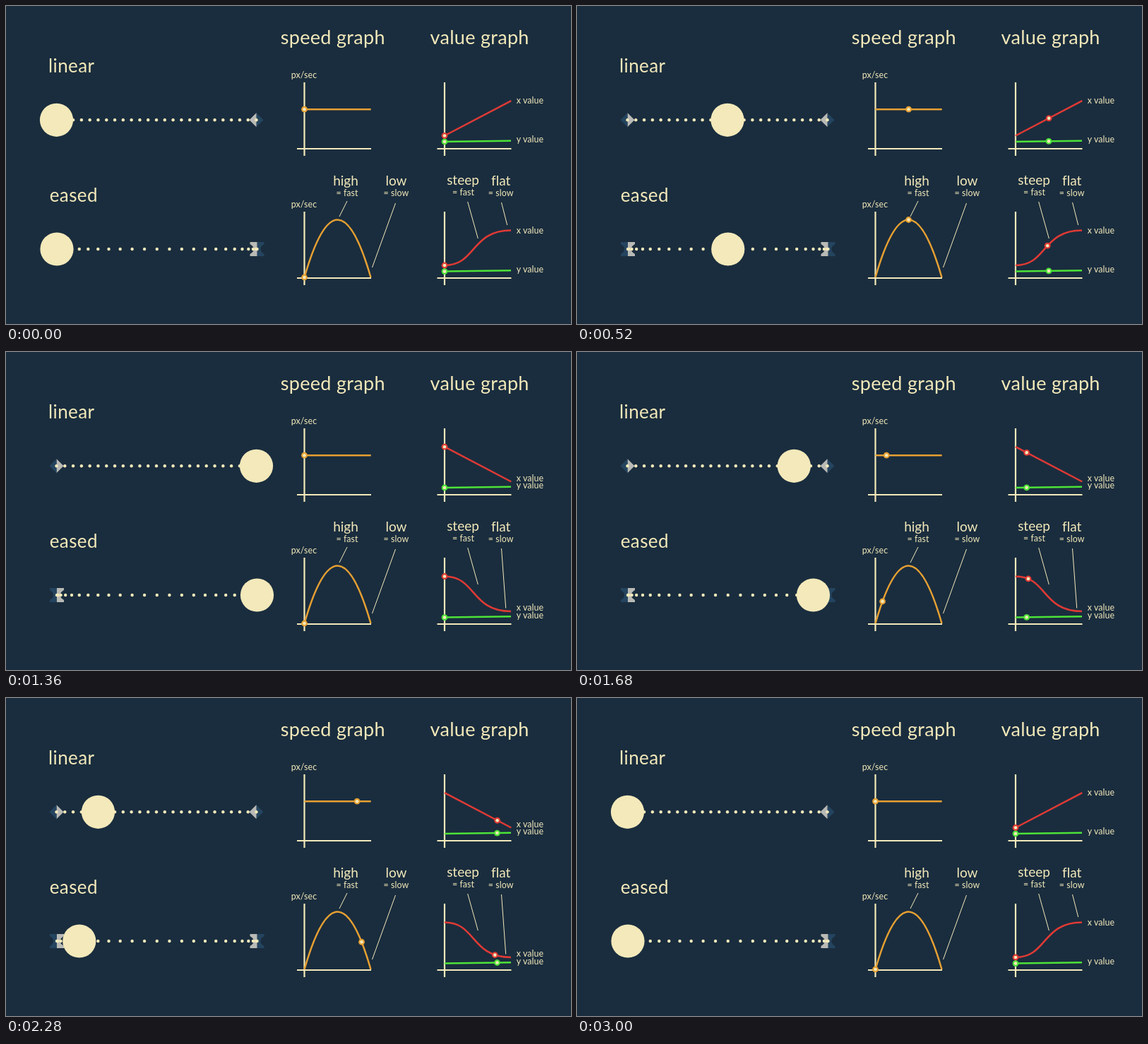
An HTML page that plays this animation: 800 px wide and 450 px high, repeating every 3.04 s.

```html
<!DOCTYPE html>
<html lang="en">
<head>
<meta charset="utf-8">
<title>Linear and eased motion</title>
<style>
  html, body { margin: 0; width: 100%; height: 100%; overflow: hidden; background: #1a2d3e; }
  svg { display: block; width: 100%; height: 100%; }
  text { font-family: Lato, "Open Sans", sans-serif; fill: #f3e9ba; text-anchor: middle; font-variant-ligatures: none; }
  .title { font-size: 27px; letter-spacing: .3px; }
  .name { font-size: 26px; letter-spacing: .4px; }
  .word { font-size: 19px; }
  .note { font-size: 12.4px; letter-spacing: .1px; }
</style>
</head>
<body>
<svg id="stage" viewBox="0 0 800 450"></svg>
<script>
const CREAM = '#f3e9ba', ORANGE = '#e6a032', RED = '#e03a35', GREEN = '#4ce338';
const LIGHT = '#b9bab6', DARK = '#24445f';
const LOOP = 3040, STEP = 40, STEPS = 24;
const FORWARD_AT = 40, BACK_AT = 1520, FALL_AT = 1200, RISE_AT = 2720;

const stage = document.getElementById('stage');

function add(tag, attrs, content) {
  const node = document.createElementNS('http://www.w3.org/2000/svg', tag);
  for (const key in attrs) node.setAttribute(key, attrs[key]);
  if (content) node.textContent = content;
  stage.appendChild(node);
  return node;
}
const label = (cls, x, y, content) => add('text', { class: cls, x, y }, content);
const stroke = (d, color, width) =>
  add('path', { d, fill: 'none', stroke: color, 'stroke-width': width });
const disc = (cx, cy, r, fill) => add('circle', { cx, cy, r, fill });
const smooth = p => p * p * (3 - 2 * p);
const linear = p => p;

function marker(x, y, eased, mirrored) {
  const half = eased
    ? 'M0-10H10V-7Q5-4 5-1V1Q5 4 10 7V10H0Z'
    : 'M0-10L10 0L0 10Z';
  for (const side of [1, -1]) {
    const lit = (side === 1) !== mirrored;
    add('path', { d: half, fill: lit ? LIGHT : DARK, transform: `translate(${x} ${y}) scale(${side} 1)` });
  }
}

function track(from, to, y, ease) {
  const at = p => from + (to - from) * ease(p);
  marker(from, y, ease === smooth, false);
  marker(to, y, ease === smooth, true);
  for (let i = 0; i <= STEPS; i++) disc(at(i / STEPS), y, 2.2, CREAM);
  const ball = disc(from, y, 23.6, CREAM);
  return p => ball.setAttribute('cx', at(p));
}

function axes(x, y) {
  stroke(`M${x} ${y - 94}V${y + 10}M${x - 10.5} ${y}H${x + 94.5}`, CREAM, 2.2);
}

// A curve with a dot that travels along it at constant speed.
function plot(d, color) {
  const curve = stroke(d, color, 2.5);
  const rim = disc(0, 0, 4.4, color), core = disc(0, 0, 2.3, CREAM);
  return (p, shape) => {
    if (shape) curve.setAttribute('d', shape);
    const { x, y } = curve.getPointAtLength(p * curve.getTotalLength());
    for (const c of [rim, core]) {
      c.setAttribute('cx', x);
      c.setAttribute('cy', y);
    }
  };
}

const slope = (a, b) => `M621 ${a}L715.3 ${b}`;
const sCurve = (a, b) => `M621 ${a}C666 ${a} 658 ${b} 715 ${b}`;

label('title', 462.8, 53.5, 'speed graph');
label('title', 670.6, 53.5, 'value graph');
label('name', 92.7, 94, 'linear');
label('name', 95.8, 277, 'eased');
label('note', 422, 101.5, 'px/sec');
label('note', 422, 285, 'px/sec');
label('word', 481, 254, 'high');
label('note', 483, 269, '= fast');
label('word', 552.5, 254, 'low');
label('note', 552.5, 269, '= slow');
label('word', 647, 253, 'steep');
label('note', 647.5, 267.5, '= fast');
label('word', 700.7, 254, 'flat');
label('note', 700.7, 269, '= slow');
label('note', 742, 193, 'y value');
label('note', 742, 376.5, 'y value');
const topX = label('note', 742, 138, 'x value');
const lowX = label('note', 742, 321.5, 'x value');

const moveLinear = track(71.5, 354.5, 161.3, linear);
const moveEased = track(72, 355.5, 344, smooth);

for (const y of [202, 385]) {
  axes(422.5, y);
  axes(621, y);
}
stroke('M483 276L472 298M551.5 279L518.5 370M653.7 277L668.3 329', CREAM, 1);
const pointer = stroke('', CREAM, 1);

const steady = [
  plot('M422.5 146.2H516.7', ORANGE),
  plot('M422.5 384Q469.5 221 516.5 384', ORANGE),
  plot('M621 192L715 190.8', GREEN),
  plot('M621 375.6L715 374.2', GREEN)
];
const topValue = plot(slope(183.5, 134.2), RED);
const lowValue = plot(sCurve(367, 317.5), RED);

function draw(t) {
  const progress = start => Math.min(1, Math.max(0, (t - start) / (STEP * STEPS)));
  const position = t < BACK_AT ? progress(FORWARD_AT) : 1 - progress(BACK_AT);
  moveLinear(position);
  moveEased(position);

  const falling = t >= FALL_AT && t < RISE_AT;
  const p = t >= RISE_AT ? 0 : progress(falling ? BACK_AT : FORWARD_AT);
  for (const update of steady) update(p);
  topValue(p, falling ? slope(134.2, 183.5) : slope(183.5, 134.2));
  lowValue(p, falling ? sCurve(317.5, 367) : sCurve(367, 317.5));
  topX.setAttribute('y', falling ? 182.5 : 138);
  lowX.setAttribute('y', falling ? 365.5 : 321.5);
  pointer.setAttribute('d', falling ? 'M701.5 278L707.7 362.5' : 'M701.5 278L709.7 310');
}

function tick() {
  const t = (performance.now() + 0.5) % LOOP;
  draw(Math.floor(t / STEP) * STEP);
  requestAnimationFrame(tick);
}
tick();
</script>
</body>
</html>
```
